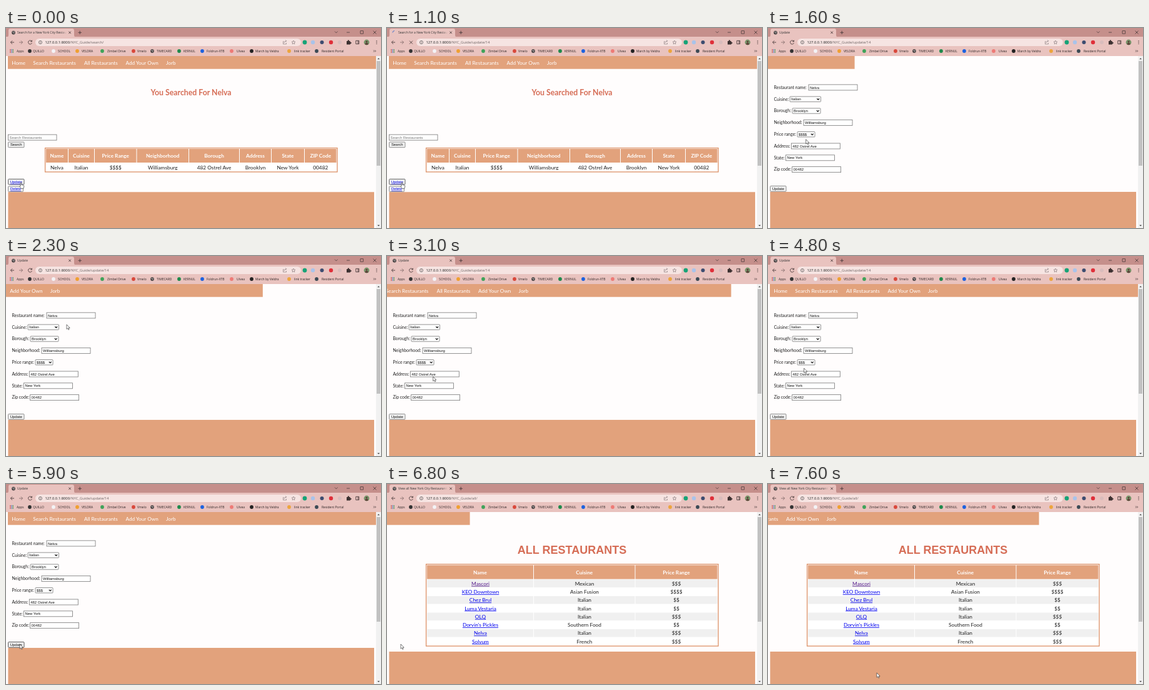
An HTML page for the animation above (7700 ms loop, 600x321 px).

```html
<!DOCTYPE html>
<html lang="en">
<head>
<meta charset="utf-8">
<title>Restaurant guide</title>
<style>
  html, body { margin: 0; width: 100%; height: 100%; overflow: hidden; background: #fff; }
  svg { display: block; width: 100vw; height: 100vh; }
  .ui { font-family: "Open Sans", "Noto Sans", sans-serif; }
  .page { font-family: Lato, sans-serif; }
  .field { font-family: "Liberation Sans", Arial, sans-serif; }
</style>
</head>
<body>
<svg id="stage" viewBox="0 0 600 321" preserveAspectRatio="none" xmlns="http://www.w3.org/2000/svg"></svg>
<script>
const LOOP = 7700;
const ORANGE = '#e2a27c', CORAL = '#d66d56', INK = '#222', LINK = '#0000ee';
const ROSE = '#c58f8b', PINK = '#e9c3bf';

// Markup helpers
const rect = (x, y, w, h, fill, more = '') =>
  `<rect x="${x}" y="${y}" width="${w}" height="${h}" fill="${fill}" ${more}/>`;
const dot = (x, y, r, fill, more = '') => `<circle cx="${x}" cy="${y}" r="${r}" fill="${fill}" ${more}/>`;
const line = (d, width = .9, color = '#4a3a3a', more = '') =>
  `<path d="${d}" fill="none" stroke="${color}" stroke-width="${width}" ${more}/>`;
const text = (x, y, str, size, fill = INK, more = '') =>
  `<text x="${x}" y="${y}" font-size="${size}" fill="${fill}" ${more}>${str}</text>`;
const group = (id, body, more = '') => `<g id="${id}" ${more}>${body}</g>`;
const MID = 'text-anchor="middle"';
const BOLD = 'font-weight="700"';
const UNDERLINE = 'text-decoration="underline"';
const EDGE = 'stroke="#767676" stroke-width=".8"';

const input = (x, cy, str, w = 78, fill = '#111') =>
  rect(x, cy - 4.5, w, 9, '#fff', EDGE) +
  text(x + 2, cy + 2.1, str, 5.9, fill, 'class="field"');
const select = (x, cy, str, w, id = '') =>
  rect(x, cy - 4.2, w, 8.4, '#fff', `${EDGE} rx=".8"`) +
  text(x + 2, cy + 2.1, str, 5.9, '#111', `class="field" id="${id}"`) +
  line(`M${x + w - 6.2} ${cy - 1}l1.9 2l1.9 -2`, 1.2, '#111');
const button = (x, y, w, str, more = '', fill = '#111', id = '') =>
  rect(x, y, w, 8.7, '#efefef', `id="${id}" ${EDGE} rx="1"`) +
  text(x + w / 2, y + 6.4, str, 5.9, fill, `class="field" ${MID} ${more}`);
const globe = (x, y) =>
  dot(x, y, 2.9, '#4a4444') + line(`M${x - 1.8} ${y - 1}l2 .6l.8 2M${x + .6} ${y - 2}l1.3 1.4`, .7, '#ddd');

function browserChrome() {
  const marks = [
    [17, 'Apps'], [43, 'QUILLO', 38, '#333'], [83, 'SCHOOL', 76, '#f3f3f6'], [121, 'VELDRA', 114, '#f0a030'],
    [162, 'Zimbel Drive', 154, '#3fa35a'], [210, 'Vmelo', 204, '#d9483b'], [241, 'TIMECARD', 234],
    [284, 'KERNUL', 277, '#1f8a4c'], [321, 'Foldrun-XTB', 314, '#1c62e0'], [369, 'Ulvea', 361, '#ee7a76'],
    [399, 'March by Veldra', 393, '#222'], [461, 'link tracker', 453, '#eda53c'], [505, 'Resident Portal', 497, '#3c4a55']
  ];
  let out = rect(0, 0, 600, 15, ROSE) + rect(0, 14, 600, 31, PINK) +
    `<path d="M1 14.5Q4 14.5 4 11V4Q4 1 7 1H106Q109 1 109 4V11Q109 14.5 112 14.5Z" fill="${PINK}"/>` +
    text(18, 9, '', 5, '#333', 'id="title" clip-path="url(#titleClip)"') +
    rect(88, 3, 9, 9, 'url(#fade)') +
    group('favicon', globe(12, 7.5)) +
    group('spinner', line('M0 -3A3 3 0 0 1 3 0', .9, '#3f6fd0')) +
    line('M100.3 5.5l3.6 3.6m0 -3.6l-3.6 3.6M115.5 7.3h5.4m-2.7 -2.7v5.4') +
    line('M526 5.5l2.3 2.3l2.3 -2.3M545 7h5M567 4.5h4.6v4.6h-4.6zM587.5 4.5l5 5m0 -5l-5 5', .8);

  out += rect(47, 17, 425, 12, '#f6e4e2', 'rx="6"') +
    line('M13 23H7.5m2.6 -2.7l-2.7 2.7l2.7 2.7') +
    line('M21 23h5.5m-2.6 -2.7l2.7 2.7l-2.7 2.7', .9, '#4a3a3a', 'opacity=".6"') +
    group('reload', line('M41 21.2A3 3 0 1 0 41.4 24M41.5 19.6v2.2h-2.3')) +
    group('stop', line('M36 20.6l5 5m0 -5l-5 5')) +
    dot(55, 23, 2.6, 'none', 'stroke="#555" stroke-width=".7"') + line('M55 22.5v2M55 21.2v.7', .7) +
    `<text x="62.4" y="25.2" font-size="5.85" fill="#1d1d1d">127.0.0.1:8000<tspan id="path" fill="#6b6060"></tspan></text>` +
    line('M444.5 21.5h-1v4.3h5v-2M445 24q.4 -3 3.6 -3.2m-1.4 -1.5l1.5 1.5l-1.5 1.5', .6, '#75676a') +
    line('M460 20l.9 2l2.1 .2l-1.6 1.4l.5 2.2l-1.9 -1.1l-1.9 1.1l.5 -2.2l-1.6 -1.4l2.1 -.2z', .6, '#75676a') +
    dot(478, 23, 3.4, '#16a377') + dot(491, 23, 3.2, '#a9c3ea') +
    dot(505.5, 23, 3, '#3c4c70') + dot(520, 23, 3.2, '#df2f3a') + dot(534, 23, 3, '#d9bcbc') +
    `<path d="M545 21h1.8a1.2 1.2 0 1 1 2.2 0h1.8v1.9a1.2 1.2 0 1 1 0 2v1.6h-5.8z" fill="#3b3030"/>` +
    line('M559.8 20.3h5v5.3h-5zM563.2 20.3v5.3') +
    dot(577, 23, 4.4, '#78946a') + dot(577, 22, 1.5, '#5b4037') +
    `<path d="M574 26q3 -4.5 6 0q-3 2 -6 0z" fill="#5b4037"/>` +
    [20.7, 23, 25.3].map(y => dot(593, y, .65, '#3b3030')).join('');

  for (let i = 0; i < 9; i++)
    out += rect(6.2 + i % 3 * 2.2, 34 + Math.floor(i / 3) * 2.2, 1.4, 1.4, ['#c9473c', '#4b7bd1', '#3f9a54'][i % 3]);
  for (const [x, name, iconX, color] of marks) {
    if (iconX) out += color ? dot(iconX, 37, 2.9, color) : globe(iconX, 37);
    out += text(x, 38.9, name, 5, '#2d2424');
  }
  out += line('M588 35.5l1.5 1.5l-1.5 1.5M590.3 35.5l1.5 1.5l-1.5 1.5', .8);
  return group('chrome', out, 'class="ui"');
}

function scrollbar() {
  return rect(592, 45, 8, 276, '#f1f1f1') + rect(593, 53, 6, 168, '#c1c1c1') +
    '<path d="M594.2 50.3l1.9 -2.3l1.9 2.3zM594.2 316l1.9 2.3l1.9 -2.3z" fill="#555"/>';
}

function navBar() {
  const items = [[9.3, 'Home'], [43.3, 'Search Restaurants'], [125, 'All Restaurants'], [191.5, 'Add Your Own'], [256, 'Jorb']];
  return group('nav', rect(3, 45, 593, 20.7, ORANGE) +
    items.map(([x, s]) => text(x, 58.8, s, 8.2, '#fff')).join(''), 'class="page"');
}

const tableFrame = (y, h) =>
  rect(62.6, y, 467.4, h, '#fff', 'stroke="#dc9167" stroke-width="1.3"');

function searchPage() {
  const columns = [
    [64, 99, 'Name', 'Nelva'], [100, 141, 'Cuisine', 'Italian'], [142, 208.5, 'Price Range', '$$$$'],
    [209.5, 292, 'Neighborhood', 'Williamsburg'], [293, 373, 'Borough', '482 Ostrel Ave'],
    [374, 424, 'Address', 'Brooklyn'], [425, 477, 'State', 'New York'], [478, 528.5, 'ZIP Code', '00482']
  ];
  let out = text(296, 108.3, 'You Searched For Nelva', 12.3, CORAL, `${MID} ${BOLD}`) +
    input(3.5, 175.6, 'Search Restaurants', 77.5, '#777') + button(3.5, 183, 25.5, 'Search') +
    tableFrame(192.6, 38.4);
  for (const [left, right, head, value] of columns) {
    const cx = (left + right) / 2;
    out += rect(left, 194, right - left, 22, ORANGE) +
      text(cx, 208, head, 8.3, '#fff', `${MID} ${BOLD}`) + text(cx, 226.6, value, 8.3, INK, MID);
  }
  out += rect(3.4, 263.3, 585.6, 58, ORANGE) +
    button(3.5, 242.5, 25.5, 'Update', UNDERLINE, LINK, 'updateLink') +
    button(3.5, 254, 24, 'Delete', UNDERLINE, LINK);
  return group('search', out, 'class="page"');
}

function formPage() {
  const rows = [
    ['Restaurant name:', y => input(65, y, 'Nelva')],
    ['Cuisine:', y => select(35, y, 'Italian', 49.5)],
    ['Borough:', y => select(39, y, 'Brooklyn', 45)],
    ['Neighborhood:', y => input(57, y, 'Williamsburg')],
    ['Price range:', y => select(47, y, '$$$$', 28, 'price')],
    ['Address:', y => input(37.3, y, '482 Ostrel Ave')],
    ['State:', y => input(28.4, y, 'New York')],
    ['Zip code:', y => input(38.6, y, '00482')]
  ];
  const body = rows.map(([label, field], i) => {
    const y = 95.4 + i * 18.82;
    return text(9.5, y + 2.3, label, 6.85, INK) + field(y);
  }).join('');
  return group('form', body + rect(3.4, 263, 585.6, 58, ORANGE) +
    button(3.5, 253.6, 25.5, 'Update', '', '#111', 'submit'), 'class="page"');
}

function listPage() {
  const rows = [
    ['Mascori', 'Mexican', 3], ['KEO Downtown', 'Asian Fusion', 4], ['Chez Brul', 'Italian', 2],
    ['Luma Vestaria', 'Italian', 2], ['OLQ', 'Italian', 3], ["Dorvin's Pickles", 'Southern Food', 2],
    ['Nelva', 'Italian', 3], ['Solvum', 'French', 3]
  ];
  const columns = [[64, 234, 'Name'], [235, 396.5, 'Cuisine'], [397.5, 528.5, 'Price Range']];
  let out = text(296, 111.8, 'ALL RESTAURANTS', 18.05, CORAL, `class="field" ${MID} ${BOLD}`) +
    tableFrame(128.7, 131.4);
  for (const [left, right, head] of columns)
    out += rect(left, 130.3, right - left, 22.3, ORANGE) +
      text((left + right) / 2, 144.8, head, 8.3, '#fff', `${MID} ${BOLD}`);
  rows.forEach(([name, cuisine, price], i) => {
    const y = 153.4 + i * 13.27;
    if (i % 2 === 0)
      for (const [left, right] of columns) out += rect(left, y, right - left, 12.5, '#f0f0f0');
    out += text(149.5, y + 9.3, name, 8.3, i ? LINK : '#551a8b', `${MID} ${UNDERLINE}`) +
      text(316, y + 9.3, cuisine, 8.3, INK, MID) + text(463, y + 9.3, '$'.repeat(price), 8.3, INK, MID);
  });
  return group('list', out + rect(3.4, 269, 585.6, 52, ORANGE), 'class="page"');
}

const pointerShape = d => `<path d="${d}" fill="#fff" stroke="#333" stroke-width=".65"/>`;
const arrow = pointerShape('M0 0V7.4L1.7 5.9L2.9 8.4L4.1 7.9L3 5.4H5.2Z');
const hand = pointerShape('M-.8 .2Q0 -.8 .8 .2V3.6L4 4.3Q5 4.6 4.8 6L4 9.6H0L-2.4 6.2Q-2 5 -.8 6Z');

document.getElementById('stage').innerHTML =
  `<defs><clipPath id="titleClip"><rect x="17" y="2" width="80" height="11"/></clipPath>
   <linearGradient id="fade"><stop stop-color="${PINK}" stop-opacity="0"/><stop offset="1" stop-color="${PINK}"/></linearGradient></defs>` +
  rect(0, 0, 600, 321, '#fffdfd') + searchPage() + formPage() + listPage() + navBar() + scrollbar() + browserChrome() +
  group('arrow', arrow) + group('hand', hand);

const el = id => document.getElementById(id);
const show = (id, on) => el(id).setAttribute('display', on ? 'inline' : 'none');
const moveTo = (id, x, y, more = '') => el(id).setAttribute('transform', `translate(${x} ${y}) ${more}`);

// Values along [time, ...numbers] keys
function along(keys, t, ease = u => u) {
  if (t <= keys[0][0]) return keys[0].slice(1);
  const next = keys.findIndex(k => k[0] > t);
  if (next < 0) return keys[keys.length - 1].slice(1);
  const a = keys[next - 1], b = keys[next], u = ease((t - a[0]) / (b[0] - a[0]));
  return a.slice(1).map((v, i) => v + (b[i + 1] - v) * u);
}
const smooth = u => u * u * (3 - 2 * u);

// CSS "ease": cubic-bezier(.25, .1, .25, 1)
function cssEase(x) {
  const bezier = (s, p, q) => 3 * s * (1 - s) ** 2 * p + 3 * s * s * (1 - s) * q + s ** 3;
  let low = 0, high = 1;
  for (let i = 0; i < 24; i++) {
    const mid = (low + high) / 2;
    if (bezier(mid, .25, .25) < x) low = mid; else high = mid;
  }
  return bezier(low, .1, 1);
}

const FORM_AT = 1200, LIST_AT = 6400;
const formSlide = [[1090, 0], [2800, .57], [3600, .82], [4000, .893], [4300, 1]];
const listSlide = [[6304, 0], [9304, 1]];
const pointer = [
  [1200, 24, 248], [2000, 97, 110], [2300, 97, 110], [2800, 80, 186], [3500, 64, 205], [4000, 64, 205],
  [4300, 62, 171], [4700, 62, 171], [5200, 20, 256], [5400, 22, 257], [6800, 22, 257], [7400, 150, 280], [7600, 174, 303]
];

function draw(t) {
  const page = t < FORM_AT ? 'search' : t < LIST_AT ? 'form' : 'list';
  for (const id of ['search', 'form', 'list']) show(id, id === page);

  const slide = page === 'search' ? 1 : cssEase(along(page === 'form' ? formSlide : listSlide, t)[0]);
  moveTo('nav', -593 * (1 - slide), 0);

  el('title').textContent = { search: 'Search for a New York City Restaurant', form: 'Update', list: 'View all New York City Restaurants' }[page];
  el('path').textContent = '/NYC_Guide/' + (t < 500 ? 'search/' : t < LIST_AT ? 'update/14' : 'all/');

  const loading = (t >= 500 && t < 1300) || (t >= 6000 && t < 6500);
  show('spinner', loading);
  show('stop', loading);
  show('favicon', !loading);
  show('reload', !loading);
  moveTo('spinner', 12, 7.5, `rotate(${t * .36 - 486})`);

  el('price').textContent = t < 4700 ? '$$$$' : '$$$';
  el('updateLink').setAttribute('stroke', '#444');
  el('submit').setAttribute('stroke', t >= 5200 ? '#333' : '#767676');

  const [x, y] = along(pointer, t, smooth);
  const overLink = t < 1300;
  show('hand', overLink);
  show('arrow', !overLink);
  moveTo(overLink ? 'hand' : 'arrow', x, y);
}

function tick() {
  draw(performance.now() % LOOP);
  requestAnimationFrame(tick);
}
tick();
</script>
</body>
</html>
```
